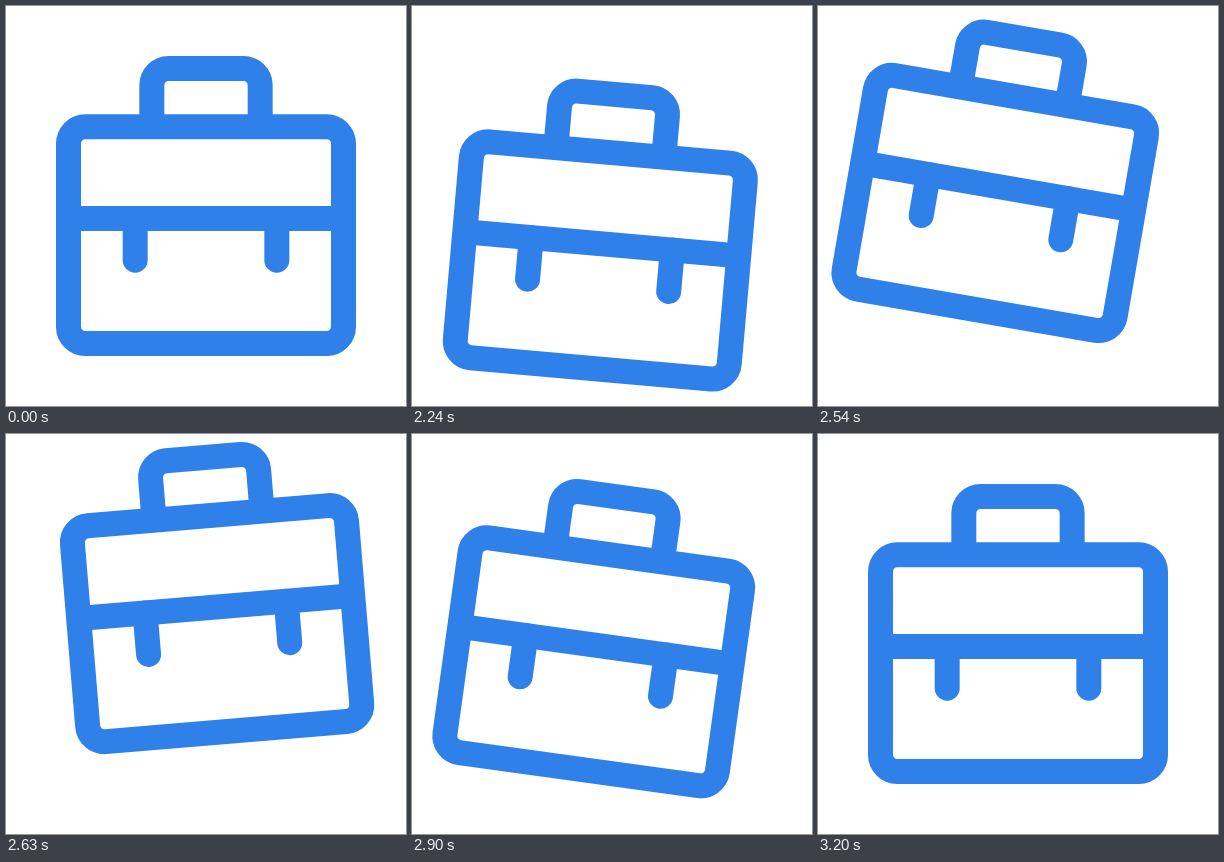
Animation of 400x400 px, one loop 3.23 s. Source, as an HTML page:

```html
<!DOCTYPE html>
<html lang="en">
<head>
<meta charset="utf-8">
<title>Swinging briefcase</title>
<style>
  html, body { margin: 0; width: 100%; height: 100%; overflow: hidden; background: #fff; }
  svg { display: block; width: 100%; height: 100%; }
  #case { fill: none; stroke: #2f80e9; stroke-width: 25; }
</style>
</head>
<body>
<svg viewBox="0 0 400 400">
  <g id="case">
    <rect x="62.5" y="120.83" width="275" height="216.67" rx="16.7"/>
    <path d="M145.83 120V79.2a16.7 16.7 0 0 1 16.7-16.7h74.94a16.7 16.7 0 0 1 16.7 16.7V120"/>
    <path d="M62.5 212.5h275"/>
    <path d="M129.17 212.5v41.67M270.83 212.5v41.67" stroke-linecap="round"/>
  </g>
</svg>
<script>
  const LOOP = 3230, START = 2000, STEP = 30;
  const PIVOT = '200 96';

  // [time in ms, value]
  const lift = [[2000, 0], [2300, 28.5], [2615, -39.3], [2910, 0]];
  const swing = [[2060, 0], [2485, 13.2], [2725, -14], [2945, 10.3], [3200, 0]];

  const ease = p => (1 - Math.cos(Math.PI * p)) / 2;

  function valueAt(keys, t) {
    if (t <= keys[0][0]) return keys[0][1];
    for (let i = 1; i < keys.length; i++) {
      const [t0, a] = keys[i - 1], [t1, b] = keys[i];
      if (t < t1) return a + (b - a) * ease((t - t0) / (t1 - t0));
    }
    return keys[keys.length - 1][1];
  }

  const bag = document.getElementById('case');
  const origin = performance.now();

  function draw(now) {
    const time = Math.max(0, now - origin) % LOOP;
    const t = START + Math.floor((time - START) / STEP) * STEP;
    const dy = valueAt(lift, t).toFixed(3);
    const angle = valueAt(swing, t).toFixed(3);
    bag.setAttribute('transform', `translate(0 ${dy}) rotate(${angle} ${PIVOT})`);
    requestAnimationFrame(draw);
  }
  draw(origin);
</script>
</body>
</html>
```
